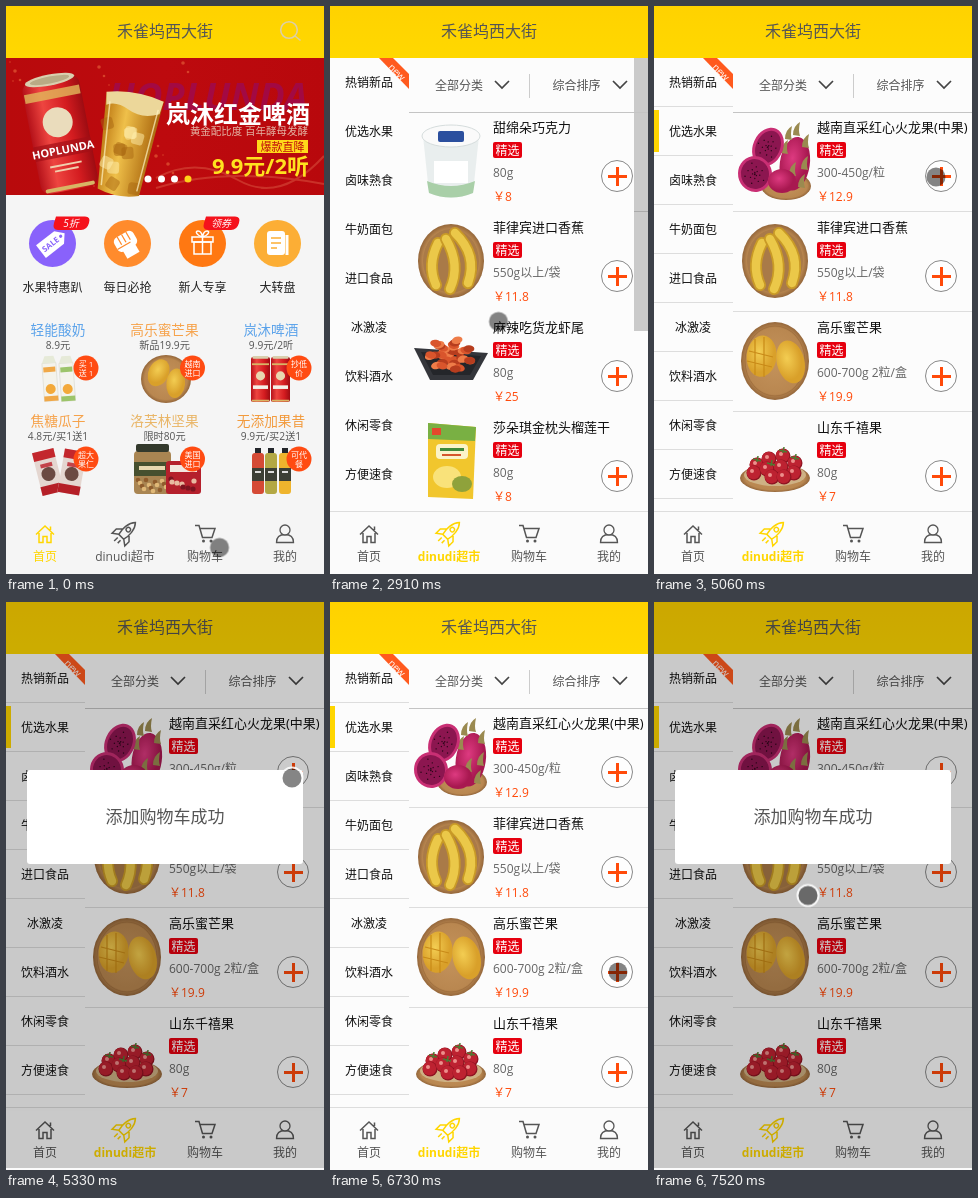
An HTML page for the animation above (8000 ms loop, 318 px wide and 568 px high).

```html
<!DOCTYPE html>
<html lang="zh-CN">
<head>
<meta charset="utf-8">
<title>Grocery app</title>
<style>
html, body { margin: 0; width: 100%; height: 100%; overflow: hidden; background: #f5f5f5; }
svg { display: block; width: 100%; height: 100%; }
text { font-family: "Open Sans", "Noto Sans CJK SC", "Noto Sans CJK", sans-serif; }
#home, #cart, #shop, #hot, #fruit, #modal, #ring, #cursor { animation: 8s step-end infinite; }
#home { animation-name: home; }
#cart { animation-name: cart; }
#shop { animation-name: shop; }
#hot { animation-name: hot; }
#fruit { animation-name: fruit; }
#modal { animation-name: modal; }
#ring { animation-name: ring; }
#cursor { animation-name: cursor; }
@keyframes home { 0% { opacity: 1 } 18.625%, 100% { opacity: 0 } }
@keyframes cart { 0% { opacity: 0 } 18.625% { opacity: 1 } 36.375%, 100% { opacity: 0 } }
@keyframes shop { 0% { opacity: 0 } 36.375%, 100% { opacity: 1 } }
@keyframes hot { 0% { opacity: 1 } 54.625%, 100% { opacity: 0 } }
@keyframes fruit { 0% { opacity: 0 } 54.625%, 100% { opacity: 1 } }
@keyframes modal { 0% { opacity: 0 } 64.75% { opacity: 1 } 84.125% { opacity: 0 } 89.25%, 100% { opacity: 1 } }
@keyframes ring {
  0% { opacity: 0 } 18.625% { opacity: 1 } 36.375% { opacity: 0 }
  64.75% { opacity: 1 } 84.125% { opacity: 0 } 89.25%, 100% { opacity: 1 }
}
@keyframes cursor {
  0% { transform: translate(213.5px, 541.5px) }
  25% { transform: translate(211px, 505px) }
  26.5% { transform: translate(195px, 420px) }
  28% { transform: translate(175px, 341px) }
  29.75% { transform: translate(168.5px, 315.5px) }
  42.625% { transform: translate(110px, 250px) }
  44.125% { transform: translate(52px, 175px) }
  45.875% { transform: translate(45px, 145px) }
  47.375% { transform: translate(42px, 131px) }
  50.875% { transform: translate(41px, 128px) }
  56.125% { transform: translate(140px, 142px) }
  57.625% { transform: translate(236px, 158px) }
  59.5% { transform: translate(269px, 159px) }
  61.375% { transform: translate(281px, 166px) }
  63.25% { transform: translate(282px, 171px) }
  66.625% { transform: translate(286px, 176px) }
  68.125% { transform: translate(298px, 210px) }
  69.625% { transform: translate(306px, 270px) }
  71.125% { transform: translate(306px, 335px) }
  72.625% { transform: translate(302.5px, 365.5px) }
  78.375% { transform: translate(301px, 366px) }
  80.25% { transform: translate(288px, 370px) }
  91% { transform: translate(262px, 352px) }
  92.5% { transform: translate(200px, 318px) }
  94%, 100% { transform: translate(154px, 293.5px) }
}
</style>
</head>
<body>
<svg viewBox="0 0 318 568" preserveAspectRatio="none">
  <defs>
    <linearGradient id="gold" x2="0" y2="1"><stop stop-color="#ffd200"/><stop offset="1" stop-color="#ffd800"/></linearGradient>
    <linearGradient id="red"><stop stop-color="#b80a0c"/><stop offset=".5" stop-color="#bd0a0e"/><stop offset="1" stop-color="#b8080c"/></linearGradient>
    <linearGradient id="can"><stop stop-color="#b5121a"/><stop offset=".3" stop-color="#ee4540"/><stop offset=".7" stop-color="#d41c20"/><stop offset="1" stop-color="#9d0c12"/></linearGradient>
    <linearGradient id="beer"><stop stop-color="#b9730f"/><stop offset=".4" stop-color="#efc04a"/><stop offset="1" stop-color="#a8640c"/></linearGradient>
    <radialGradient id="plate"><stop stop-color="#c4935c"/><stop offset=".85" stop-color="#b98750"/><stop offset="1" stop-color="#94663a"/></radialGradient>
    <radialGradient id="mango" cx=".4" cy=".4"><stop stop-color="#f3cd52"/><stop offset="1" stop-color="#d9a02a"/></radialGradient>
    <radialGradient id="pink" cx=".4" cy=".4"><stop stop-color="#dd3a80"/><stop offset="1" stop-color="#a81850"/></radialGradient>
  </defs>
  <g id="home"></g>
  <g id="cart"></g>
  <g id="shop"></g>
  <g id="cursor">
    <circle id="ring" r="10.5" fill="none" stroke="#fff" stroke-width="2" stroke-opacity=".85"/>
    <circle r="9.5" fill-opacity=".48"/>
  </g>
</svg>
<script>
const INK = '#555', GOLD = '#ffd600', HOT = '#ff4a0a';
const put = (id, html) => document.getElementById(id).innerHTML = html;
const each = (list, fn) => list.map(fn).join('');
const times = (n, fn) => each([...Array(n).keys()], fn);
const text = (x, y, s, size, fill, more = '', anchor = 'middle') =>
  `<text x="${x}" y="${y}" font-size="${size}" fill="${fill}" text-anchor="${anchor}" ${more}>${s}</text>`;
const left = (x, y, s, size, fill, more) => text(x, y, s, size, fill, more, 'start');
const rect = (x, y, w, h, fill, more = '') =>
  `<rect x="${x}" y="${y}" width="${w}" height="${h}" fill="${fill}" ${more}/>`;
const oval = (x, y, rx, ry, fill, more = '') =>
  `<ellipse cx="${x}" cy="${y}" rx="${rx}" ry="${ry}" fill="${fill}" ${more}/>`;
const dot = (x, y, r, fill, more) => oval(x, y, r, r, fill, more);
const shape = (d, fill) => `<path d="${d}" fill="${fill}"/>`;
const line = (d, stroke, width = 1.5, more = '') =>
  `<path d="${d}" fill="none" stroke="${stroke}" stroke-width="${width}" ${more}/>`;
const group = (transform, html) => `<g transform="${transform}">${html}</g>`;
const bold = 'font-weight="700"';

const header = title => rect(0, 0, 318, 52, 'url(#gold)') + text(159, 31, title, 16, INK);

const icons = [
  c => line('M30 528.5L39 520L48 528.5M33 527V536.5H37V530.5H41V536.5H45V527M44.5 524V520.5', c),
  c => group('translate(119.5 526.5) rotate(45)',
    line('M0-14C5-9 5 0 3.5 6H-3.5C-5 0-5-9 0-14ZM-4-1L-9 4V10L-3.5 6M4-1L9 4V10L3.5 6M-2 9V14M2 9V13', c) +
    dot(0, -4, 2.2, 'none', `stroke="${c}" stroke-width="1.4"`)),
  c => line('M189 519.5H193L196.5 531.5H206L209 522.5H194', c) +
    dot(197.5, 535, 1.5, c) + dot(205, 535, 1.5, c),
  (c, back) => line('M270.5 536.5C270.5 530.5 274 528.5 279 528.5S287.5 530.5 287.5 536.5Z', c, 1.3) +
    dot(279, 524, 5, back, `stroke="${c}" stroke-width="1.3"`)
];
const nav = (active, back) => rect(0, 506, 318, 62, back) +
  each(['首页', 'dinudi超市', '购物车', '我的'], (label, i) => {
    const on = i === active, color = on ? GOLD : INK;
    return icons[i](color, back) + text(39 + 80 * i, 555, label, 12, color, on && i ? bold : '');
  });

const place = '禾雀坞西大街';

// Home page
const beerCan = (x, y, w, h) => rect(x, y, w, h, 'url(#can)', `rx="${w / 9}"`) +
  rect(x + w * .08, y - h * .02, w * .84, h * .06, '#d9cfae', `rx="${w / 20}"`) +
  rect(x + w * .05, y + h * .95, w * .9, h * .04, '#d8b565') +
  rect(x + 1, y + h * .14, w - 2, h * .04, '#d8b565') +
  dot(x + w / 2, y + h * .42, w * .24, '#e8d8b0') +
  rect(x + 2, y + h * .63, w - 4, h * .08, '#f5efe6');

const bigCan = group('translate(54 128) rotate(-11)',
  rect(-29, -56, 58, 113, 'url(#can)', 'rx="9"') +
  oval(0, -55, 25, 5.5, '#d9cfae') + oval(0, -55, 20, 3.5, '#b9ab85') + rect(-28, -45, 56, 9, '#e3b95c', 'opacity=".8"') +
  rect(-25, 52, 50, 4, '#d8b565', 'rx="2"') + dot(0, -12, 15, '#eadcbc') +
  rect(-29, 8, 58, 15, '#a30f16', 'opacity=".7"') + text(0, 20, 'HOPLUNDA', 11, '#fff', bold) +
  rect(-16, 30, 32, 2, '#f0cfae') + rect(-12, 35, 24, 2, '#f0cfae'));
const glass = group('translate(121 137) rotate(10)',
  shape('M-29-47H29L21 50Q0 57-21 50Z', 'url(#beer)') +
  shape('M-29-47Q0-55 29-47L27-34Q10-26-4-33T-27-34Z', '#ecd79a') +
  times(11, i => rect(-20 + i * 23 % 32, -30 + i * 17 % 70, 12, 12, i % 2 ? '#fff0ae' : '#a8650f',
    `rx="3" opacity=".5" transform="rotate(${i * 31 % 50 - 25})"`)) +
  line('M-24-38L-18 46M25-38L18 46', '#fff4c4', 1.5, 'opacity=".7"'));

const banner = rect(0, 52, 318, 137, 'url(#red)') +
  text(202, 104, 'HOPLUNDA', 38, '#9b0a55', bold + ' font-style="italic" opacity=".75"') +
  line('M150 172Q190 150 232 174T318 150M150 182Q220 160 318 178', '#dc5a44', 2, 'opacity=".5"') +
  times(40, i => dot(4 + i * 37 % 180, 56 + i * 53 % 128, .8 + i % 3 * .5, '#e8663c', 'opacity=".6"')) +
  bigCan + glass +
  text(232, 116.5, '岚沐红金啤酒', 24, '#fff', 'font-weight="900"') +
  text(243, 128.5, '黄金配比度 百年酵母发酵', 10.5, '#e3b4a4') +
  rect(251, 134, 51, 13, '#ffd91a') + text(276.5, 144.5, '爆款直降', 11, '#c00d0d') +
  text(254.5, 168, '9.9元/2听', 22, '#ffe11f', bold) +
  each([142, 155.5, 168.5, 182], (x, i) => dot(x, 173, 3.5, i < 3 ? '#fff' : '#ffd21a'));

const white = 'stroke="#fff" stroke-width="1.5"';
const entries = [
  ['水果特惠趴', '#8962fb', group('translate(46 237) rotate(-38)',
    shape('M-14-8H9L16 0L9 8H-14Z', '#fff') + text(-2, 3, 'SALE', 8, '#8962fb', bold) + dot(11, 0, 1.6, '#8962fb')), '5折'],
  ['每日必抢', '#ff8b2c', group('translate(121 238) rotate(-30)',
    rect(-11, -11, 22, 16, '#fff', 'rx="5"') + rect(-7, 4, 14, 9, '#fff') +
    line('M-5-11V-2M0-11V-2M5-11V-2M-11 0H4', '#ff8b2c', 1.3))],
  ['新人专享', '#ff7812', rect(186, 231, 21, 5, 'none', white) + rect(188, 236, 17, 12, 'none', white) +
    line('M196.5 231V248M196.5 231C190 229 189 225 192 225S196 228 196.5 231C197 228 198 225 201 225S203 229 196.5 231', '#fff'), '领券'],
  ['大转盘', '#fcae35', rect(261, 225, 18, 24, '#fff', 'rx="3"') +
    line('M265 232H275M265 237H275M265 242H271', '#fcae35', 1.6) + line('M281 229V249', '#fff', 3)]
];
const menu = each(entries, ([label, fill, art, tag], i) => {
  const x = 46 + 75 * i;
  return dot(x + .5, 237.5, 23.5, fill) + art + text(x + .5, 285.5, label, 12, '#222') +
    (tag ? shape(`M${x + 4} 210.5H${x + 33}Q${x + 39} 210.5 ${x + 37} 217Q${x + 35} 224 ${x + 29} 224H${x + 6}Q${x} 224 ${x + 2} 217Z`, '#f5121c') +
      text(x + 19, 221, tag, 10, '#fff', 'font-style="italic"') : '');
});

const mangoPair = oval(-12, -3, 13, 18, 'url(#mango)', 'transform="rotate(6)"') +
  oval(13, 4, 12, 19, 'url(#mango)', 'transform="rotate(-14)"');
const carton = (x, tint) => group(`translate(${x} 373) rotate(-4)`,
  rect(-7, -16, 14, 38, '#f4f3ec', 'stroke="#dcdcd2" stroke-width=".7"') + shape('M-7-16L-4-23H5L7-16Z', '#e6ead8') +
  rect(-6, -12, 12, 5, tint) + dot(0, 10, 5, '#f3a93a') + rect(-7, 17, 14, 5, tint));
const nutBag = (x, tilt) => group(`translate(${x} 466) rotate(${tilt})`,
  rect(-11, -22, 22, 44, '#e4d6d0') + rect(-11, -22, 22, 9, '#c3272d') + rect(-11, 13, 22, 9, '#b51f27') +
  dot(0, 2, 7, '#6b4a42') + rect(-6, -9, 12, 4, '#c3434a'));
const bottle = (x, fill) => rect(x + 3, 442, 6, 7, '#23262b') +
  rect(x, 447, 12, 41, fill, 'rx="3"') + rect(x, 462, 12, 13, '#3c3f36') + rect(x + 3, 465, 6, 2, '#ddd');
const photos = [
  carton(44, '#f0a848') + carton(61, '#9cc46a'),
  oval(160, 373, 25, 24, 'url(#plate)') + group('translate(160 373) rotate(20) scale(.78)', mangoPair),
  beerCan(245, 351, 19, 45) + beerCan(265, 351, 19, 45),
  nutBag(42, -14) + nutBag(66, 10),
  rect(128, 445, 37, 43, '#a98552', 'rx="4"') + rect(130, 438, 33, 8, '#33392c', 'rx="2"') +
    rect(128, 456, 37, 14, '#46502f') + rect(133, 460, 26, 4, '#e8d8b0') +
    times(14, i => dot(132 + i * 11 % 31, 474 + i * 5 % 12, 2.3, i % 2 ? '#e0b877' : '#8f5c2c')) +
    rect(160, 455, 35, 33, '#b5202c', 'rx="3"') + rect(164, 459, 27, 7, '#f2e7df') +
    times(8, i => dot(165 + i * 11 % 27, 473 + i * 5 % 11, 2.6, i % 2 ? '#e8b9a0' : '#7c1420')),
  bottle(246, '#d54a35') + bottle(259, '#b3a844') + bottle(273, '#efb42d')
];
const BLUE = '#5aa2ea', ORANGE = '#f6a24a';
const deals = [
  ['轻能酸奶', '8.9元', BLUE, '买 1', '送 1'],
  ['高乐蜜芒果', '新品19.9元', ORANGE, '越南', '进口'],
  ['岚沐啤酒', '9.9元/2听', BLUE, '抄低', '价'],
  ['焦糖瓜子', '4.8元/买1送1', ORANGE, '超大', '果仁'],
  ['洛芙林坚果', '限时80元', '#e9b566', '美国', '进口'],
  ['无添加果昔', '9.9元/买2送1', '#f29a3c', '可代', '餐']
];
const grid = each(deals, ([name, price, fill, a, b], i) => {
  const x = 52 + 106.5 * (i % 3), y = i < 3 ? 0 : 91;
  return text(x, 329 + y, name, 13.7, fill, 'font-weight="500"') + text(x, 342.5 + y, price, 10.2, INK) + photos[i] +
    dot(x + 28, 362 + y, 12.5, '#ff4b12') + text(x + 28, 360.5 + y, a, 8, '#fff') + text(x + 28, 370 + y, b, 8, '#fff');
});
const search = dot(283, 24, 8.3, 'none', 'stroke="#dccfa6" stroke-width="1.6"') + line('M289 30L294.5 34.5', '#dccfa6', 1.6);
put('home', rect(0, 0, 318, 568, '#f5f5f5') + header(place) + search + banner + menu + grid + nav(0, '#f5f5f5'));

// Empty cart
put('cart', rect(0, 0, 318, 568, '#fefefe') + header('购物车') +
  text(159, 268, '亲，你的购物车是空哒.....', 15, '#e8501e') +
  rect(122.5, 286.5, 73, 49, '#fff', 'stroke="#ddd"') +
  text(159, 317, '去逛逛吧', 15, '#dc3a35') + nav(2, '#f4f4f4'));

// Shop; photos are drawn around the centre of their row
const bananas = oval(0, 0, 33, 37, 'url(#plate)') + oval(0, 0, 28, 32, '#a97a48') +
  each(['M-13-18Q-24 4-15 24', 'M-5-22Q10 4-1 28', 'M4-28Q27-6 17 22'], d =>
    line(d, '#c99a26', 12, 'stroke-linecap="round"') + line(d, '#ebc849', 8.5, 'stroke-linecap="round"'));
const tub = shape('M-28-25L-22 32Q0 41 22 32L28-25Z', '#e9eeee') + oval(0, -25, 29, 11, '#fafafa', 'stroke="#d5dcdc"') +
  rect(-13, -30, 26, 11, '#2b4f9e', 'rx="2"') + rect(-17, 0, 34, 22, '#fff') +
  shape('M-24 20Q0 30 24 20L22 32Q0 41-22 32Z', '#a9cfa8');
const crayfish = shape('M-37-13L37-8L22 19H-21Z', '#34363b') + shape('M-30-9L30-5L19 14H-18Z', '#24262a') +
  times(34, i => {
    const a = i * 2.4, r = Math.sqrt(i / 34);
    return oval(Math.cos(a) * r * 23, -6 + Math.sin(a) * r * 15, 5.5, 3.6,
      ['#d9552c', '#ee7c48', '#b73d1e'][i % 3], `transform="rotate(${i * 13 % 40 - 20})"`);
  });
const durian = shape('M-23-38L25-34L22 38L-23 36Z', '#f1c62d') + shape('M-23-38L25-34L24-20L-23-22Z', '#79b043') +
  rect(-15, -17, 32, 15, '#fbf3c9', 'rx="4"') + rect(-11, -13, 24, 3, '#3f8a3b') + rect(-9, -7, 19, 2, '#d5562c') +
  oval(-4, 16, 14, 11, '#f9e27a') + oval(11, 23, 10, 8, '#8fa23b') + rect(-19, -33, 9, 7, '#e4482c');
const halfFruit = (x, y, rx, ry, tilt) => group(`translate(${x} ${y}) rotate(${tilt})`,
  oval(0, 0, rx, ry, '#c92f74') + oval(0, 0, rx - 3, ry - 3, '#8c1650') +
  times(18, i => dot(Math.cos(i * 2.4) * i * .6, Math.sin(i * 2.4) * i * .75, .7, '#2b0618')));
const dragon = oval(11, 25, 25, 14, 'url(#plate)') + oval(20, 0, 15, 27, 'url(#pink)', 'transform="rotate(8)"') +
  each([[14, -30], [22, -34], [31, -22], [10, -16], [30, 0], [18, 6], [27, 18]], ([x, y]) =>
    shape(`M${x - 4} ${y + 8}Q${x - 4} ${y - 1} ${x + 3} ${y - 5}Q${x + 1} ${y + 4} ${x + 3} ${y + 9}Z`, '#9a8a50')) +
  halfFruit(-7, -14, 15, 20, 24) + halfFruit(-20, 13, 17, 18, -10) + oval(7, 20, 14, 12, 'url(#pink)');
const mangoes = oval(0, 0, 34, 39, 'url(#plate)') + oval(0, 0, 30, 35, 'none', 'stroke="#a2713f"') +
  group('scale(1.15)', mangoPair) + line('M-26-10L-2-4M-28 0L-3 6M-20-22V14M-11-24V16', '#c98a17', 1.2);
const tomatoes = oval(0, 13, 35, 14, 'url(#plate)') + oval(0, 10, 31, 11, '#ceb184') +
  each([[-18, 0], [-6, -6], [8, -9], [20, -2], [-21, 8], [-8, 4], [6, 2], [19, 8], [-3, 12], [9, 12]], ([x, y]) =>
    dot(x, y, 7.5, '#8f1422') + dot(x - .5, y - .5, 6.8, '#bd2231') + dot(x - 2, y - 2, 2, '#ec8f8c')) +
  each([[-18, -6], [8, -15], [20, -8], [-4, -2]], ([x, y]) =>
    line(`M${x - 4} ${y}L${x + 4} ${y + 2}M${x} ${y + 3}L${x + 1} ${y - 3}`, '#4e7a32'));

const row = ([name, size, price, photo], i) => group(`translate(0 ${i * 100})`,
  group('translate(121 155)', photo) +
  left(163, 125.5, name, 13, '#111') +
  rect(163, 136, 29, 16, '#e6000f', 'rx="2"') + text(177.5, 148.5, '精选', 12, '#fff', 'font-weight="500"') +
  left(163, 171, size, 12, '#666') + left(163, 195, '￥', 12, HOT) + left(175, 195, price, 12, HOT) +
  dot(287, 170, 15.5, '#fefefe', 'stroke="#888"') + line('M278 170.5H297M287.5 161V180', HOT, 3));
const banana = ['菲律宾进口香蕉', '550g以上/袋', '11.8', bananas];
const hotRows = [
  ['甜绵朵巧克力', '80g', '8', tub],
  banana,
  ['麻辣吃货龙虾尾', '80g', '25', crayfish],
  ['莎朵琪金枕头榴莲干', '80g', '8', durian]
];
const fruitRows = [
  ['越南直采红心火龙果(中果)', '300-450g/粒', '12.9', dragon],
  banana,
  ['高乐蜜芒果', '600-700g 2粒/盒', '19.9', mangoes],
  ['山东千禧果', '80g', '7', group('translate(0 4)', tomatoes)]
];
const kinds = ['热销新品', '优选水果', '卤味熟食', '牛奶面包', '进口食品', '冰激凌', '饮料酒水', '休闲零食', '方便速食'];
const chevron = x => line(`M${x} 75L${x + 7} 82L${x + 14} 75`, '#444', 1.7);
const rule = (x, y, w) => rect(x, y, w, 1, '#ddd');

put('shop', rect(0, 0, 318, 568, '#fcfcfc') + header(place) +
  `<g id="hot">${rect(304, 52, 14, 273, '#cacaca') + rect(304, 205, 14, 1, '#aaa') + each(hotRows, row)}</g>` +
  `<g id="fruit">${rect(0, 104, 5, 42, GOLD) + each(kinds, (k, i) => rule(0, 100 + 49 * i, 79)) +
    each([205, 305, 405], y => rule(79, y, 239)) + each(fruitRows, row)}</g>` +
  each(kinds, (k, i) => text(39, 80.5 + 49 * i, k, 12, '#111')) +
  shape('M49 52H63L79 68V83Z', '#ff5a1e') +
  text(0, 0, 'new', 10, '#fff', 'transform="translate(64.5 68.5) rotate(45)"') +
  left(105, 84, '全部分类', 12, INK) + chevron(165) + rect(199, 68, 1, 24, '#ccc') +
  left(222.5, 84, '综合排序', 12, INK) + chevron(283) + rect(79, 106, 239, 1, '#c4c4c4') +
  nav(1, '#fbfbfb') + rule(0, 505, 318) +
  `<g id="modal">${rect(0, 0, 318, 566, '#000', 'fill-opacity=".2"') + rect(21, 168, 276, 94, '#fff', 'rx="3"') +
    text(159, 221, '添加购物车成功', 17, INK)}</g>`);
</script>
</body>
</html>
```
